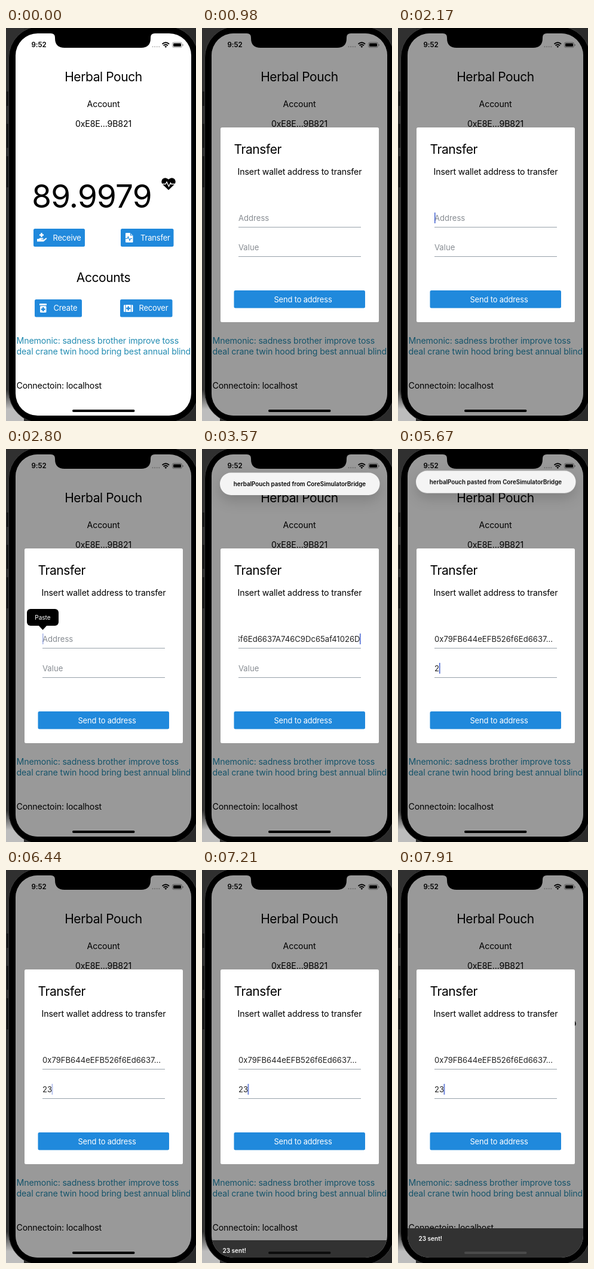
Recreate the animation shown at these times as an HTML page. Size 318x656 px, loop 8 s.

```html
<!DOCTYPE html>
<html lang="en">
<head>
<meta charset="utf-8">
<title>Wallet transfer</title>
<style>
html, body { margin: 0; width: 318px; height: 656px; overflow: hidden; background: #2b2b2b; }
svg { display: block; }
text { font: 400 14.2px Inter, "Liberation Sans", sans-serif; letter-spacing: -.01em; font-feature-settings: "calt" 0; }
.mid { text-anchor: middle; }
.title { font-size: 21px; letter-spacing: -.02em; }
.amount { font-size: 53px; letter-spacing: -.015em; }
.label { font-size: 12.9px; fill: #fff; }
.input { font-size: 13.1px; letter-spacing: 0; fill: #222; }
.hint { fill: #878c92; }
.small { font-size: 10px; font-weight: 600; letter-spacing: 0; }
.blue { fill: #2089dc; }
.line { stroke: #98a1aa; }
.cursor { fill: #4361d0; }

/* One loop is 8 s, so 1% is 80 ms. */
.swap { animation: 8s step-end infinite; }
.move { animation: 8s linear infinite; }

.modal { animation-name: modal; }
@keyframes modal { 0% { opacity: 0 } 10.4%, to { opacity: 1 } }

.addr-hint { animation-name: addr-hint; }
@keyframes addr-hint { 0% { opacity: 1 } 39.3%, to { opacity: 0 } }
.addr-end { animation-name: addr-end; }
@keyframes addr-end { 0% { opacity: 0 } 39.3% { opacity: 1 } 56.8%, to { opacity: 0 } }
.addr-start { animation-name: addr-start; }
@keyframes addr-start { 0% { opacity: 0 } 56.8%, to { opacity: 1 } }

.val-hint { animation-name: val-hint; }
@keyframes val-hint { 0% { opacity: 1 } 70.8%, to { opacity: 0 } }
.val-one { animation-name: val-one; }
@keyframes val-one { 0% { opacity: 0 } 70.8% { opacity: 1 } 74.3%, to { opacity: 0 } }
.val-two { animation-name: val-two; }
@keyframes val-two { 0% { opacity: 0 } 74.3%, to { opacity: 1 } }

.addr-caret { animation-name: addr-caret; }
@keyframes addr-caret { 0% { transform: none } 39.3%, to { transform: translateX(203px) } }
.val-caret { animation-name: val-caret; }
@keyframes val-caret {
  0% { transform: none }
  70.8% { transform: translateX(8px) }
  74.3%, to { transform: translateX(15.6px) }
}
.addr-blink { animation-name: addr-blink; }
@keyframes addr-blink {
  0%, 24.39% { opacity: 0 }
  24.4%, 28.9% { opacity: 1 }
  30.6%, 32.3% { opacity: 0 }
  33.2%, 34.4% { opacity: 1 }
  35% { opacity: .5 }
  35.9%, 38.4% { opacity: 0 }
  39.3%, 50.7% { opacity: 1 }
  52.5%, 54.2% { opacity: 0 }
  55.1%, 56.79% { opacity: 1 }
  56.8%, to { opacity: 0 }
}
.val-blink { animation-name: val-blink; }
@keyframes val-blink {
  0%, 56.79% { opacity: 0 }
  56.8%, 61.4% { opacity: 1 }
  63%, 65.5% { opacity: 0 }
  66.5%, 79.7% { opacity: 1 }
  81.3%, 84.8% { opacity: 0 }
  86.6%, 91% { opacity: 1 }
  92.7%, 97% { opacity: 0 }
  98.4%, to { opacity: 1 }
}

.paste { animation-name: paste; }
@keyframes paste { 0%, 34.3% { opacity: 0 } 34.9%, 38.4% { opacity: 1 } 39.3%, to { opacity: 0 } }

.banner { filter: drop-shadow(0 9px 11px rgba(0, 0, 0, .16)); animation-name: banner; }
@keyframes banner {
  0%, 39.6% { transform: translateY(-110px); animation-timing-function: ease-out }
  44.2%, 70% { transform: none; animation-timing-function: ease-in }
  76.5%, to { transform: translateY(-110px) }
}

.snack { animation-name: snack; }
@keyframes snack {
  0%, 88.3% { transform: translateY(52px); animation-timing-function: ease-out }
  92.5%, to { transform: none }
}
.home { animation-name: home; }
@keyframes home { 0%, 89.5% { fill: #000 } 93%, to { fill: #4a4a4a } }

.heart { animation-name: heart; }
@keyframes heart { 0% { transform: none } 92.7%, to { transform: translateX(14px) } }
</style>
</head>
<body>
<svg width="318" height="656" viewBox="0 0 318 656">
  <defs>
    <clipPath id="screen"><rect x="16" y="9" width="294" height="638" rx="37"/></clipPath>
    <linearGradient id="desk" x2="0" y2="1">
      <stop offset=".92" stop-color="#303030"/>
      <stop offset=".97" stop-color="#bdbdbd"/>
    </linearGradient>
    <path id="plus" d="M-1.2-3.5h2.4v2.3h2.3v2.4H1.2v2.3h-2.4V1.2h-2.3v-2.4h2.3z"/>
  </defs>

  <!-- Desk and phone body -->
  <rect width="318" height="656" fill="#2b2b2b"/>
  <rect width="30" height="656" fill="url(#desk)"/>
  <path d="M1 106h4v24H1zM1 160h4v40H1zM1 214h4v52H1z" fill="#151515"/>
  <rect x="4.500" y="-3" width="317.500" height="662" rx="53" stroke="#3e3e3e"/>

  <g clip-path="url(#screen)">
    <rect x="16" y="9" width="294" height="638" fill="#fff"/>

    <!-- Home page -->
    <text class="mid title" x="163" y="89">Herbal Pouch</text>
    <text class="mid" x="163" y="132">Account</text>
    <text class="mid" x="163" y="165">0xE8E...9B821</text>
    <text class="mid amount" x="143.500" y="300">89.9979</text>
    <g class="swap heart">
      <path d="M272 270.500l-10-9.500q-3.500-4.500 0-9q5-4 10 .8q5-4.800 10-.8q3.500 4.500 0 9z"/>
      <path d="M260 260.500h7l2-3.500 3.500 7.500 3-6 1 2h8" fill="none" stroke="#fff" stroke-width="1.400"/>
    </g>

    <g class="blue">
      <rect x="46" y="335" width="86" height="30" rx="2.500"/>
      <rect x="192" y="335" width="88.500" height="30" rx="2.500"/>
      <rect x="48" y="453" width="79" height="29.500" rx="2.500"/>
      <rect x="191" y="453" width="87.500" height="29.500" rx="2.500"/>
    </g>
    <g fill="#fff">
      <use href="#plus" x="59.500" y="345.500"/>
      <path d="M52 352h2.500l2.500-1.500h5q1.500 1 0 2h-3v.8h4l3.500-2.600q2.500-.5 1.500 1.300l-5 4.500H52z"/>
      <path d="M201 342h7l4.500 4.500V357q0 1-1 1H201q-1 0-1-1v-14q0-1 1-1z"/>
      <rect x="56" y="460" width="12" height="3" rx=".8"/>
      <rect x="57" y="464" width="10.500" height="11" rx="1.500"/>
      <rect x="197" y="462" width="15.500" height="12" rx="1.500"/>
    </g>
    <g class="blue">
      <use href="#plus" x="62.200" y="469.500"/>
      <use href="#plus" x="204.700" y="468"/>
      <path d="M199.500 462h1v12h-1zM209 462h1v12h-1z"/>
    </g>
    <path d="M198 351.500h5l1.500-3 2.500 6 1.500-3h2.500M208.500 342v4h4" fill="none" stroke="#2089dc" stroke-width="1.200"/>
    <text class="label" x="78.500" y="354.600">Receive</text>
    <text class="label" x="225" y="354.600">Transfer</text>
    <text class="label" x="79.500" y="472.400">Create</text>
    <text class="label" x="222.500" y="472.400">Recover</text>

    <text class="mid title" x="163" y="424">Accounts</text>
    <g fill="#238cb2">
      <text x="17.500" y="527">Mnemonic: sadness brother improve toss</text>
      <text x="17.500" y="545">deal crane twin hood bring best annual blind</text>
    </g>
    <text x="17.500" y="602">Connectoin: localhost</text>

    <!-- Transfer dialog -->
    <g class="swap modal">
      <rect x="16" y="9" width="294" height="638" opacity=".4"/>
      <rect x="31" y="166" width="265" height="325" rx="2.500" fill="#fff"/>
      <text class="title" x="53.500" y="210">Transfer</text>
      <text class="mid" x="163.500" y="245">Insert wallet address to transfer</text>
      <path class="line" d="M61 332.500h205M61 381.500h205"/>

      <text class="input hint swap addr-hint" x="61" y="321.800">Address</text>
      <svg x="61" y="304" width="204" height="26">
        <text class="input swap addr-end" x="203.500" y="17.800" text-anchor="end">0x79FB644eEFB526f6Ed6637A746C9Dc65af41026D</text>
      </svg>
      <text class="input swap addr-start" x="61" y="321.800">0x79FB644eEFB526f6Ed6637...</text>
      <g class="swap addr-caret"><rect class="cursor move addr-blink" x="61" y="308" width="1.500" height="18"/></g>

      <text class="input hint swap val-hint" x="61" y="371">Value</text>
      <text class="input swap val-one" x="61" y="371">2</text>
      <text class="input swap val-two" x="61" y="371">23</text>
      <g class="swap val-caret"><rect class="cursor move val-blink" x="61" y="357" width="1.500" height="18"/></g>

      <rect class="blue" x="53.500" y="438" width="219.500" height="29.500" rx="2.500"/>
      <text class="label mid" x="169" y="457.600">Send to address</text>
    </g>

    <g class="move paste">
      <rect x="35" y="267" width="53" height="28" rx="6"/>
      <path d="M54.500 294.500h14l-7 7.500z"/>
      <text class="small mid" style="font-weight:400" x="61.500" y="284.600" fill="#fff">Paste</text>
    </g>

    <g class="move snack">
      <rect x="16" y="598" width="294" height="49" fill="#323232"/>
      <text class="small" x="34.500" y="619" fill="#fff">23 sent!</text>
    </g>

    <g class="move banner">
      <rect x="30" y="39.500" width="267.500" height="37.500" rx="18.700" fill="#f4f4f4"/>
      <text class="small mid" style="font-size:9.800px" x="163.500" y="61.800">herbalPouch pasted from CoreSimulatorBridge</text>
    </g>
  </g>

  <!-- Notch, status bar, home indicator -->
  <path d="M75 7v2q7 0 7 7v1q0 16 16 16h128q16 0 16-16v-1q0-7 7-7V7z"/>
  <text class="small" style="font-size:11.500px" x="42.500" y="32.300">9:52</text>
  <path d="M245.500 31.200h12" stroke="#000" stroke-opacity=".3" stroke-width="2" stroke-linecap="round" stroke-dasharray="0 3.600"/>
  <path d="M261.500 26.700q5.800-5 11.600 0M263.600 29.200q3.700-3 7.400 0" fill="none" stroke="#000" stroke-width="1.800"/>
  <path d="M265.300 30.800q2-1.500 4 0l-2 2.200z"/>
  <rect x="278.500" y="24" width="16" height="8.500" rx="2.500" fill="none" stroke="#000" stroke-opacity=".4"/>
  <rect x="280" y="25.500" width="13" height="5.500" rx="1.300"/>
  <rect x="295.600" y="27" width="1.200" height="2.800" rx=".6" fill-opacity=".45"/>
  <rect class="move home" x="111" y="637" width="104.500" height="4" rx="2"/>
</svg>
</body>
</html>
```
